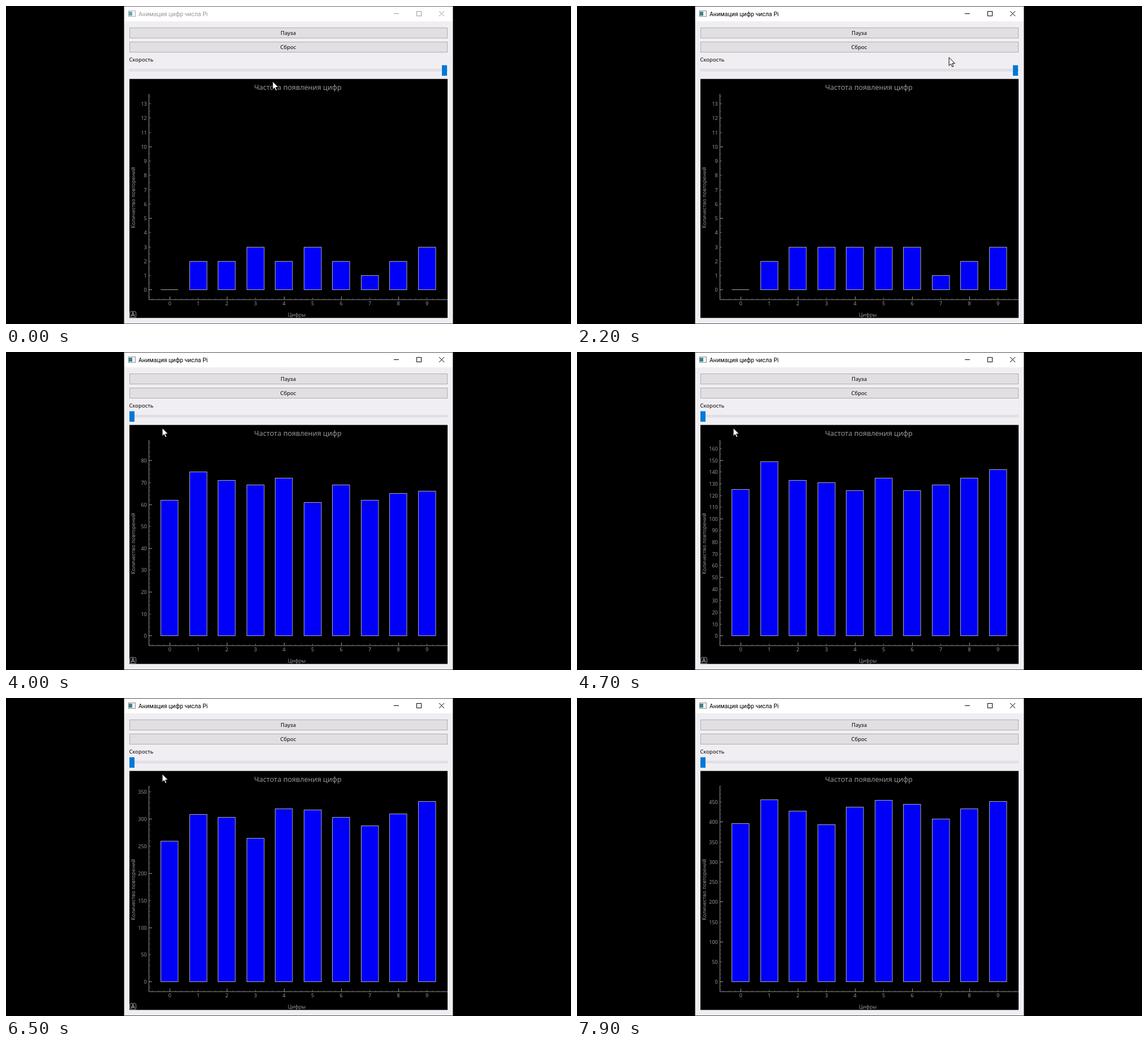
An HTML page with a canvas for the animation above (8000 ms loop, 998 by 561 pixels).

```html
<!DOCTYPE html>
<html lang="ru">
<head>
<meta charset="utf-8">
<title>Анимация цифр числа Pi</title>
<style>
html, body { margin: 0; width: 100%; height: 100%; overflow: hidden; background: #000; }
canvas { display: block; }
</style>
</head>
<body>
<canvas id="stage" width="998" height="561"></canvas>
<script>
const ctx = document.getElementById('stage').getContext('2d');
const LOOP = 8000, STEP = 100;
const UI = '"Noto Sans", "Open Sans", sans-serif';
const GREY = '#969696', BLUE = '#0078d7';
const ZERO_Y = 500.8, SPAN = 328.3, AXIS_X = 252.5, AXIS_Y = 518, TOP = 155;

// Decimals of pi by Machin's formula
function piDecimals(count) {
  const one = 10n ** BigInt(count + 10);
  const arctanInverse = x => {
    let term = one / x, sum = term, sign = -1n;
    for (let k = 3n; term; k += 2n, sign = -sign) {
      term /= x * x;
      sum += sign * (term / k);
    }
    return sum;
  };
  const pi = 4n * (4n * arctanInverse(5n) - arctanInverse(239n));
  return pi.toString().slice(1, count + 1);
}
const decimals = piDecimals(4500);

// Linear interpolation over [time, ...values] keys
function track(keys, t) {
  const i = keys.findIndex(k => k[0] > t);
  if (i < 0) return keys[keys.length - 1].slice(1);
  const a = keys[i - 1], b = keys[i], p = (t - a[0]) / (b[0] - a[0]);
  return a.slice(1).map((v, j) => v + (b[j + 1] - v) * p);
}
const pointerKeys = [
  [0, 471, 133], [200, 471, 133], [700, 481, 15], [1300, 481, 65], [1800, 500, 69],
  [2500, 775, 107], [2900, 775, 107], [3300, 219, 127], [3700, 219, 127], [4000, 276, 134]
];
const fastKeys = [[3300, 24], [4000, 672], [5500, 2075], [6500, 3006], [7900, 4303], [8000, 4396]];

function digitCounts(t) {
  const shown = t < 3300 ? 20 + Math.floor((t + 800) / 1000) : Math.round(track(fastKeys, t)[0]);
  const counts = Array(10).fill(0);
  for (const d of decimals.slice(0, shown)) counts[d]++;
  return counts;
}

function box(x, y, w, h, fill, stroke) {
  ctx.fillStyle = fill;
  ctx.fillRect(x, y, w, h);
  if (!stroke) return;
  ctx.strokeStyle = stroke;
  ctx.strokeRect(x + 0.5, y + 0.5, w - 1, h - 1);
}
function line(color, ...points) {
  ctx.strokeStyle = color;
  ctx.beginPath();
  for (let i = 0; i < points.length; i += 4) {
    ctx.moveTo(points[i], points[i + 1]);
    ctx.lineTo(points[i + 2], points[i + 3]);
  }
  ctx.stroke();
}
function text(str, x, y, size, color, align = 'center', family = UI) {
  ctx.font = `${size}px ${family}`;
  ctx.textAlign = align;
  ctx.fillStyle = color;
  ctx.fillText(str, x, y);
}

function drawTitleBar(active) {
  const ink = active ? '#000' : '#999';
  box(208, 0, 582, 561, '#f0eef2', active ? '#505050' : '#666');
  box(209, 1, 580, 26, '#fff');
  ctx.globalAlpha = active ? 1 : 0.7;
  box(216, 8, 13, 11, '#f4f4f4', '#8a9094');
  box(217, 10, 6, 7, '#3f8588');
  ctx.globalAlpha = 1;
  text('Анимация цифр числа Pi', 234, 17.5, 10.5, ink, 'left', 'Roboto, sans-serif');
  line(ink, 685, 13.5, 694, 13.5);
  ctx.strokeRect(725.5, 9.5, 8, 8);
  line(ink, 765, 9, 774, 18, 774, 9, 765, 18);
}

function drawControls(pointer, t) {
  ['Пауза', 'Сброс'].forEach((label, i) => {
    const y = 38 + i * 25;
    const hover = pointer && pointer[1] >= y && pointer[1] < y + 19;
    box(218, y, 562, 19, hover ? '#e5f1fb' : '#e1dfe2', hover ? BLUE : '#adadad');
    text(label, 498.5, y + 13, 9.5, '#000');
  });
  text('Скорость', 217.5, 97.5, 9.5, '#000', 'left');
  box(218, 111, 562, 4, '#e7e5e8', '#d6d4d8');
  const dragging = t >= 2800 && t < 3700;
  const x = t < 2800 ? 770 : t < 3700 ? Math.max(218, Math.min(770, pointer[0] - 5)) : 218;
  box(x, 104.5, 9, 18.5, dragging ? '#cbc9cc' : BLUE);
}

// Spacing of major, minor and extra ticks
function tickSteps(range) {
  const limit = range / 2.45;
  const unit = 10 ** Math.floor(Math.log10(limit));
  const lead = [5, 2, 1].find(m => m * unit <= limit);
  const [minor, extra] = { 1: [0.5, 0.1], 2: [1, 0.2], 5: [1, 0.5] }[lead];
  return [lead * unit, minor * unit, extra * unit];
}

function drawTicks(steps, from, to, draw) {
  steps.forEach((step, level) => {
    ctx.globalAlpha = 1 / (level + 1);
    for (let i = Math.ceil(from / step); i * step <= to; i++) draw(i * step, 5.5 / (1 + level / 2));
  });
  ctx.globalAlpha = 1;
}

function drawPlot(counts, hovered) {
  box(218, 128.7, 562, 421.6, '#000');
  text('Частота появления цифр', 515.5, 148.3, 12.55, GREY);
  text('Цифры', 513.5, 548, 9, GREY);
  ctx.save();
  ctx.translate(228, 338);
  ctx.rotate(-Math.PI / 2);
  text('Количество повторений', 0, 0, 9, GREY);
  ctx.restore();

  const range = Math.max(...counts) + 10, scale = SPAN / range;
  const toY = v => ZERO_Y - v * scale, toX = v => 289.2 + v * 50.48;
  const snap = v => Math.floor(v) + 0.5;

  line(GREY, AXIS_X, TOP, AXIS_X, AXIS_Y, AXIS_X, AXIS_Y, 780, AXIS_Y);
  const steps = tickSteps(range);
  drawTicks(steps, (ZERO_Y - AXIS_Y) / scale, (ZERO_Y - TOP) / scale, (v, len) =>
    line(GREY, AXIS_X, snap(toY(v)), AXIS_X + len, snap(toY(v))));
  drawTicks([2, 1, 0.2], -0.7, 9.7, (v, len) =>
    line(GREY, snap(toX(v)), AXIS_Y, snap(toX(v)), AXIS_Y - len));

  const labelStep = steps[1] * scale > 18 ? steps[1] : steps[0];
  for (let v = 0; toY(v) > TOP + 5; v += labelStep) text(v, 248.7, toY(v) + 3.5, 9, GREY, 'right');

  const base = snap(ZERO_Y);
  counts.forEach((count, digit) => {
    text(digit, toX(digit), 528.3, 9, GREY);
    const x = snap(toX(digit) - 15.3), y = snap(toY(count));
    ctx.fillStyle = '#0000f8';
    ctx.strokeStyle = '#a8a8a8';
    ctx.fillRect(x, y, 30.5, base - y);
    ctx.strokeRect(x, y, 30.5, base - y);
  });

  if (hovered) {
    ctx.strokeStyle = GREY;
    ctx.beginPath();
    ctx.roundRect(219, 538.8, 10.5, 11, 2);
    ctx.stroke();
    text('A', 224.2, 548.3, 11, '#c4c4c4');
  }
}

const arrow = new Path2D('M0 0V14.5L3.3 11.4 5.5 16.5 7.8 15.5 5.6 10.5H10.3Z');
function drawPointer([x, y]) {
  ctx.save();
  ctx.translate(x, y);
  ctx.fillStyle = '#fff';
  ctx.strokeStyle = '#000';
  ctx.fill(arrow);
  ctx.stroke(arrow);
  ctx.restore();
}

function render(t) {
  const pointer = t < 7800 ? track(pointerKeys, t) : null;
  const dragging = t >= 2800 && t < 3700;
  ctx.lineWidth = 1;
  ctx.fillStyle = '#000';
  ctx.fillRect(0, 0, 998, 561);
  drawTitleBar(t >= 700);
  drawControls(pointer, t);
  drawPlot(digitCounts(t), pointer && pointer[1] > 129 && !dragging);
  if (pointer) drawPointer(pointer);
}

const start = performance.now();
function frame() {
  const t = (performance.now() - start) % LOOP;
  render(Math.floor(t / STEP) * STEP);
  requestAnimationFrame(frame);
}
frame();
</script>
</body>
</html>
```
